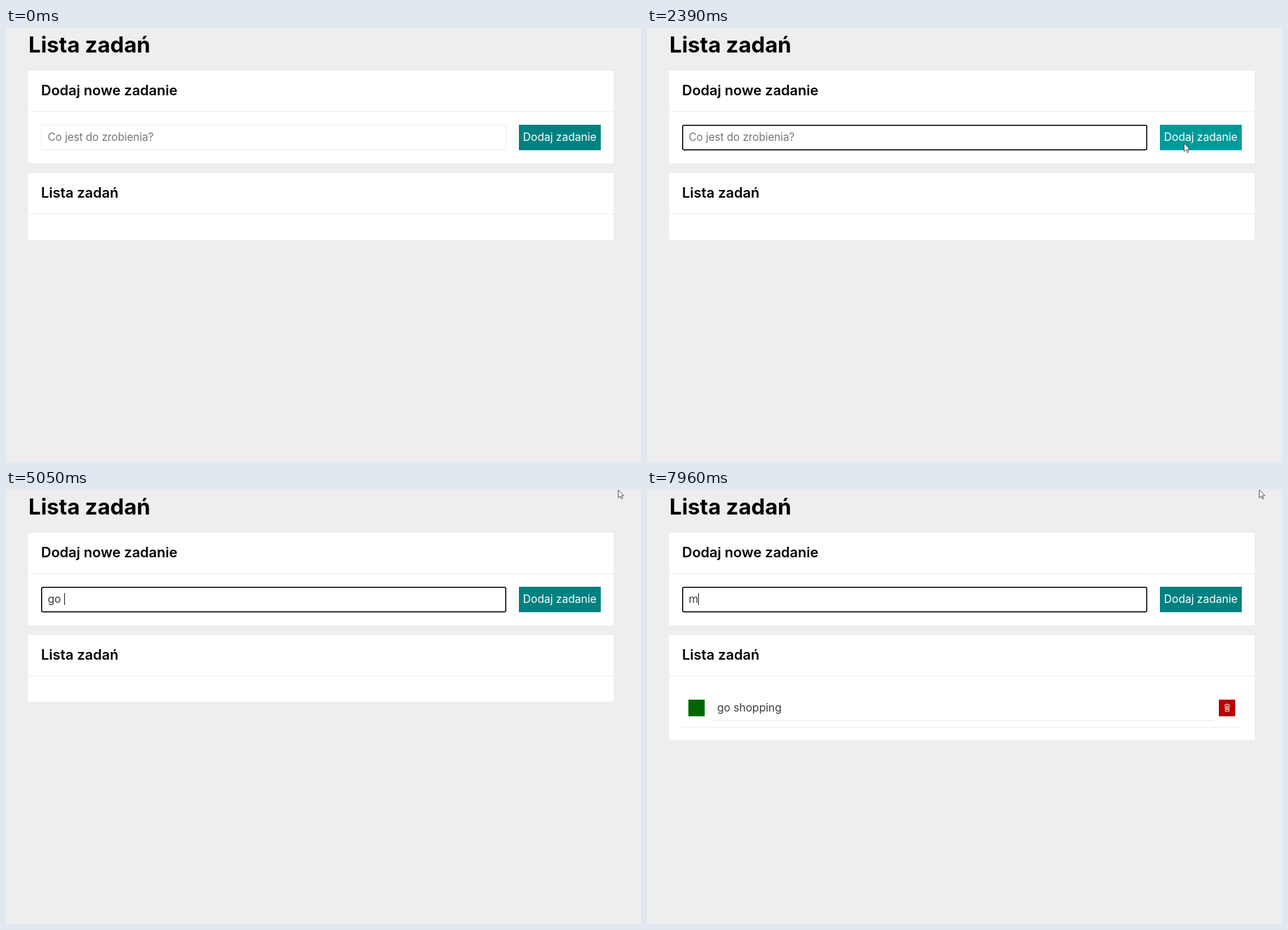
Write an HTML page that moves like this. It is 905x619 px and loops after 8 s.

```html
<!DOCTYPE html>
<html lang="pl">
<head>
<meta charset="utf-8">
<title>Lista zadań</title>
<style>
  html, body { margin: 0; width: 100%; height: 100%; overflow: hidden; background: #eee; }
  svg { display: block; width: 100vw; height: 100vh; }
  text { font-family: Inter, "Open Sans", sans-serif; font-size: 15.6px; white-space: pre; }
  .title { font-size: 31.2px; font-weight: 700; }
  .head { font-size: 20px; font-weight: 600; }
  .hint { font-size: 15.2px; fill: #757575; }
  .panel { fill: #fff; }
  .rule { fill: #eee; }
</style>
</head>
<body>
<svg viewBox="0 0 905 619">
  <rect width="905" height="619" fill="#eee"/>
  <text class="title" x="32" y="34.5">Lista zadań</text>

  <rect class="panel" x="31.5" y="61" width="834.5" height="132"/>
  <rect class="rule" x="31.5" y="119" width="834.5" height="1"/>
  <text class="head" x="50" y="96">Dodaj nowe zadanie</text>
  <rect id="field" fill="#fff"/>
  <text id="hint" class="hint" x="59.5" y="161">Co jest do zrobienia?</text>
  <text id="typed" x="59.5" y="161" fill="#3c3c3c" xml:space="preserve"></text>
  <rect id="caret" y="147" width="1" height="17" fill="#222"/>
  <rect id="button" x="731" y="138" width="116.7" height="36.3"/>
  <text x="736.8" y="161" fill="#fff">Dodaj zadanie</text>

  <rect id="list" class="panel" x="31.5" y="207" width="834.5"/>
  <rect class="rule" x="31.5" y="265" width="834.5" height="1"/>
  <text class="head" x="50" y="242">Lista zadań</text>
  <g id="item">
    <rect x="59" y="299" width="23.3" height="23.7" fill="#060"/>
    <text x="100" y="315.5" fill="#3c3c3c">go shopping</text>
    <rect class="rule" x="92" y="328.5" width="715" height="1"/>
    <rect class="rule" x="50" y="338" width="798" height="1"/>
    <rect x="815" y="299" width="23.3" height="23.7" fill="#b80000"/>
    <path d="M823 306.3H831M825.3 305.2H828.7M823.8 307L824.4 315.5H829.6L830.2 307M825.7 308V314M827 308V314M828.3 308V314"
      fill="none" stroke="#fff" stroke-width=".8"/>
  </g>

  <g id="pointer">
    <path id="arrow" d="M.5.5V12.2L3.2 9.7L5 13.8L6.8 13L5 9.1H8.6Z" fill="#fff" stroke="#333" stroke-width=".8"/>
    <path id="beam" d="M-2.5-7.5H2.5M0-7.5V7.5M-2.5 7.5H2.5" stroke="#222" stroke-width="1"/>
    <circle id="glow" r="11" fill="#ffeb00" fill-opacity=".58"/>
  </g>
</svg>
<script>
const LOOP = 8000, BLINK = 531, STEP = 67, CLICK = 1460, ADDED = 7160;
const el = id => document.getElementById(id);
const show = (id, on) => el(id).setAttribute("visibility", on ? "visible" : "hidden");
const set = (id, attrs) => {
  for (const name in attrs) el(id).setAttribute(name, attrs[name]);
};

// time, field content
const typing = [
  [CLICK, ""], [4720, "g"], [4850, "go"], [5050, "go "], [5180, "go s"],
  [5310, "go sh"], [5580, "go sho"], [5780, "go shop"], [5980, "go shopp"],
  [6110, "go shoppi"], [6440, "go shoppin"], [6700, "go shopping"],
  [ADDED, ""], [7230, ""], [7960, "m"]
];

// time, x, y of the pointer
const route = [
  [310, 797, 585], [511, 797, 450], [712, 799, 235], [779, 808, 150],
  [846, 806, 127], [913, 805, 160], [2253, 805, 160], [2387, 765, 164],
  [2655, 605, 152], [2789, 605, 152], [2990, 705, 95], [3124, 872, -1]
];

const smooth = k => k * k * (3 - 2 * k);

function pointerAt(t) {
  const s = 310 + Math.floor((t - 310) / STEP) * STEP;
  const next = route.findIndex(p => p[0] > s);
  if (next < 0) return route[route.length - 1].slice(1);
  if (next === 0) return route[0].slice(1);
  const [a, b] = [route[next - 1], route[next]];
  const k = smooth((s - a[0]) / (b[0] - a[0]));
  return [a[1] + (b[1] - a[1]) * k, a[2] + (b[2] - a[2]) * k];
}

const inside = (x, y, left, right) => x >= left && x <= right && y >= 138 && y <= 174;

function drawPointer(t) {
  const [x, y] = pointerAt(t);
  const visible = t >= 310;
  const overField = inside(x, y, 50, 713);
  set("pointer", { transform: `translate(${x} ${y})` });
  show("arrow", visible && !overField);
  show("beam", visible && overField);
  show("glow", t >= 1190 && t < CLICK);
  set("button", { fill: visible && inside(x, y, 731, 848) ? "#009999" : "#008080" });
}

// Stroked frame whose outer edge stays fixed
function drawFrame(line, rx, stroke) {
  set("field", {
    x: 50 + line / 2, y: 138 + line / 2, width: 663 - line, height: 36.5 - line,
    rx, stroke, "stroke-width": line
  });
}

function drawField(t) {
  const focused = t >= CLICK;
  const [since, value] = typing.filter(e => e[0] <= t).pop() || [0, ""];
  if (focused) drawFrame(1.5, 2, "#000");
  else drawFrame(1, 0, "#eee");
  show("hint", !value);
  const typed = el("typed");
  if (typed.textContent !== value) typed.textContent = value;
  const width = value ? typed.getComputedTextLength() : 0;
  set("caret", { x: Math.round(59.7 + width) });
  show("caret", focused && Math.floor((t - since) / BLINK) % 2 === 0);
}

function render(t) {
  const added = t >= ADDED;
  drawPointer(t);
  drawField(t);
  set("list", { height: added ? 150 : 95 });
  show("item", added);
}

const start = performance.now();
function tick() {
  render((performance.now() - start) % LOOP);
  requestAnimationFrame(tick);
}
tick();
</script>
</body>
</html>
```
